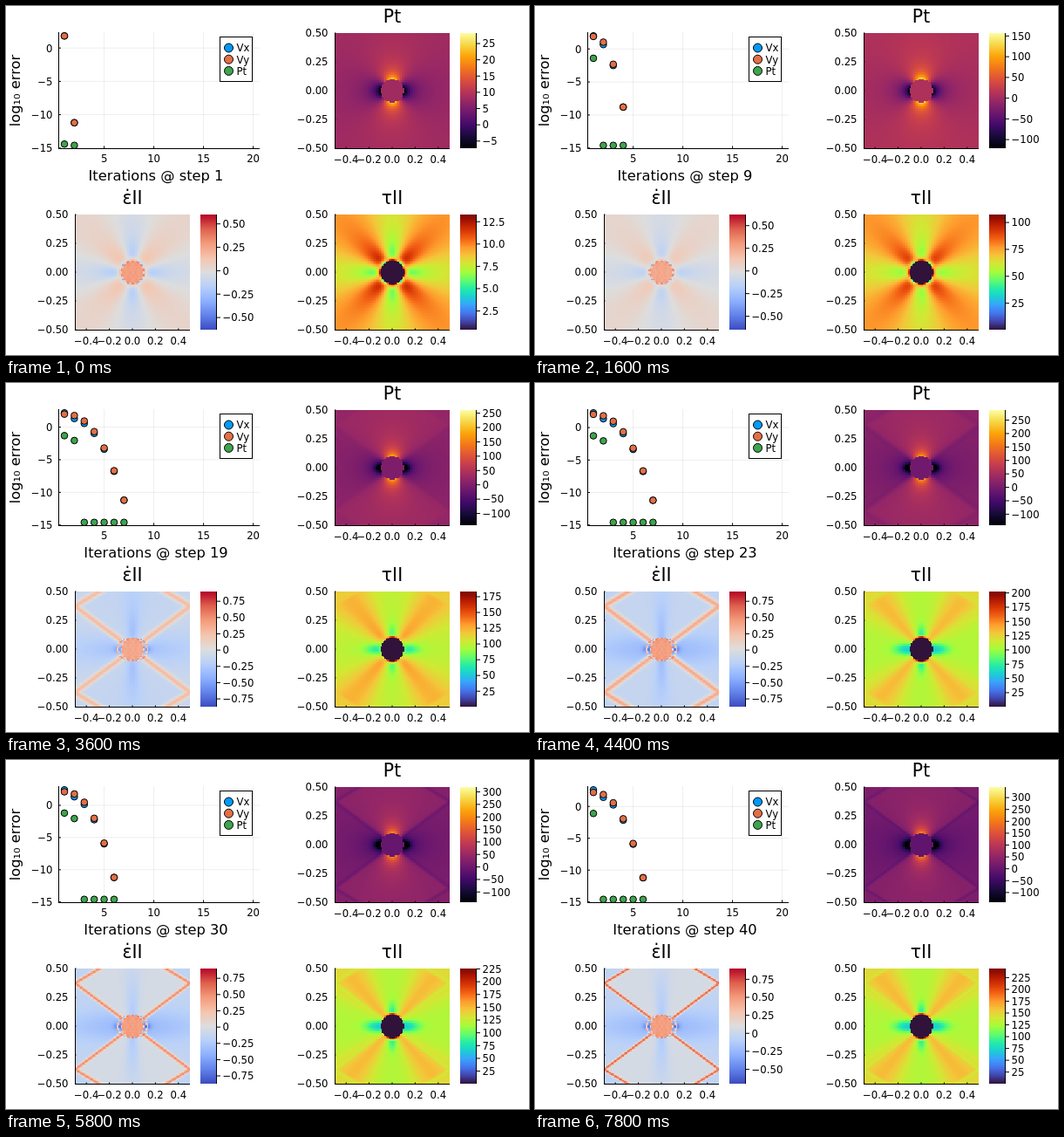
These frames come from a looping animation (600 px wide and 400 px high, 8 s). An HTML page with a canvas:

```html
<!DOCTYPE html>
<html lang="en">
<head>
<meta charset="utf-8">
<title>Shear band formation around a weak inclusion</title>
<style>
html, body { margin: 0; width: 100%; height: 100%; overflow: hidden; background: #fff; }
canvas { display: block; }
</style>
</head>
<body>
<canvas id="stage" width="600" height="400"></canvas>
<script>
const ctx = document.getElementById('stage').getContext('2d');
const FONT = '"DejaVu Sans", sans-serif';
const STEP_MS = 200, STEPS = 40, N = 88, SIZE = 132;
const SERIES = [['Vx', '#009afa'], ['Vy', '#e36f47'], ['Pt', '#3ea44e']];

const mix = (a, b, t) => a + (b - a) * t;
const clamp = v => Math.min(1, Math.max(0, v));
const bell = v => Math.exp(-v * v);
const smooth = (a, b, v) => { const t = clamp((v - a) / (b - a)); return t * t * (3 - 2 * t); };
const hash = (i, j) => { const v = Math.sin(i * 12.99 + j * 78.23) * 43758.5; return v - Math.floor(v); };

// Loading history: stress saturates while the bands localise
function paramsAt(s) {
  const tMax = 2 + 258 * (1 - Math.exp(-((s / 16) ** 1.12)));
  const pMax = 10 + 1.37 * tMax, pMin = Math.max(7 - 14.2 * s, -141);
  const yielding = smooth(8, 14, s);
  return {
    tMin: .4, tMax, pMin, pMax,
    eMin: -mix(.63, .87, yielding) + .17 * smooth(35, 40, s),
    eMax: mix(.6, .9, yielding),
    pBase: (8 - pMin) / (pMax - pMin),
    pert: .5 + .4 * Math.exp(-s / 12),
    core: .74 - .13 * bell((s - 14) / 4),
    plastic: smooth(11, 23, s),
    ear: yielding,
    sharp: smooth(17, 30, s),
    width: .012 + .014 * Math.exp(-Math.max(0, s - 23) / 5),
    peak: .7 + .16 * smooth(22, 38, s)
  };
}

// Newton residuals of one step: slow start, then fast convergence
function residualsAt(s) {
  const n = s < 7 ? 2 : s < 18 ? 4 : s < 27 ? 7 : 6;
  const top = 1.8 + .01 * s, end = -11.2 + 2.4 * bell((s - 9) / 2), floor = -14.6;
  const vx = [], vy = [], pt = [];
  for (let i = 0; i < n; i++) {
    const u = i / (n - 1);
    vy.push(mix(top, end, u ** 2.3));
    vx.push(vy[i] + (i ? -.55 * (1 - u) : .01 * s));
    pt.push(floor);
  }
  pt[0] = n > 2 ? -1.5 + .01 * s : -14.4;
  if (s > 17 && s < 38) pt[1] = -2.05;
  return [vx, vy, pt];
}

function gradient(hex) {
  const stops = hex.split(' ').map(h => [0, 2, 4].map(i => parseInt(h.substr(i, 2), 16)));
  return v => {
    const p = v * (stops.length - 1), i = Math.min(stops.length - 2, Math.floor(p));
    return stops[i].map((c, n) => Math.round(mix(c, stops[i + 1][n], p - i)));
  };
}
const inferno = gradient('000004 160b39 420a68 6a176e 932667 bc3754 dd513a f37819 fca50a f6d746 fcffa4');
const coolwarm = gradient('3b4cc0 6282ea 8db0fe b8d0f9 dddddd f5c4ad f49a7b de604d b40426');
const turbo = gradient('30123b 4145ab 4675ed 39a2fc 1bcfd4 24eca6 61fc6c a4fc3b d1e834 f3c63a fe9b2d f36315 d93806 b11901 7a0403');

// Pressure, strain rate and stress in one quadrant, each scaled to 0..1
function fieldsAt(i, j, p) {
  const x = (i + .5) / N, y = (j + .5) / N, r = Math.hypot(x, y), angle = Math.atan2(y, x);
  const zero = -p.eMin / (p.eMax - p.eMin), noise = hash(i, j);
  const rim = Math.abs(Math.hypot(x / (1 + .3 * p.ear), y) - .1) < .007;
  const speck = noise < .4 ? .85 : noise < .55 ? .2 : .55;

  if (r < .1) {
    const core = p.core + (noise - .5) * .04;
    return [p.pBase - .03 * p.plastic, r > .092 ? mix(core, speck, .5) : core, 0];
  }

  // Elastic solution around a weak disc
  const q = .01 / (r * r), c2 = Math.cos(2 * angle), s2 = Math.sin(2 * angle);
  const h = p.pert * (2 * q - 3 * q * q);
  const g = Math.hypot(c2 * (1 - h), s2 * (1 + h)) - .06 * Math.cos(4 * angle) * (1 - q);
  const pe = p.pBase - .5 * q * c2;
  const ee = zero + Math.log10(Math.max(.2, g)) / (p.eMax - p.eMin);
  const te = .66 * g;

  // Plastic state: shear band reflected at the side wall
  const above = y - .75 * x, beyond = y - .375 - .6 * (.5 - x);
  const band = Math.max(bell(above / 1.25 / p.width) * smooth(.1, .13, r), bell(beyond / 1.17 / p.width));
  const wedge = smooth(-.03, .03, above), corner = smooth(-.02, .02, beyond);
  const zone = (side, mid, end) => mix(mix(side, mid, wedge), end, corner);
  const axis = bell(x / (.03 + .12 * y)) * bell(y / .45);
  const ear = bell((x - .12) / .04) * bell(y / .03);
  const cap = bell((r - .1) / .015) * bell(x / .05) * (y > x ? 1 : 0);

  const pp = zone(p.pBase + .02, p.pBase + .06, p.pBase + .04) - .4 * q * c2
    - .2 * ear - .05 * band * p.sharp;
  const ep = zone(.41 - .12 * bell(y / .14) * bell(x / .6), .38 + .09 * p.sharp - .12 * axis, .4) - .2 * ear;
  const tp = mix(.52 + .14 * bell((angle - .87) / .33), .6, corner)
    - .24 * bell((x - .11) / .12) * bell(y / .05)
    - .16 * bell((y - .11) / .1) * bell(x / .04)
    - .04 * band * p.sharp + .7 * cap;

  const w = p.plastic, e = mix(ee, mix(ep, p.peak, band), w);
  return [mix(pe, pp, w), rim ? mix(e, speck, .7) : e, mix(te, tp, w)];
}

const MAPS = [
  { x: 377, y: 31, title: 'Pt', base: 18.5, color: inferno, key: 'p' },
  { x: 79, y: 239, title: 'ε\u0307II', base: 226.5, color: coolwarm, key: 'e' },
  { x: 377, y: 239, title: 'τII', base: 226.5, color: turbo, key: 't' }
];
for (const m of MAPS) {
  m.buf = document.createElement('canvas');
  m.buf.width = m.buf.height = N;
  m.ctx = m.buf.getContext('2d');
  m.img = m.ctx.createImageData(N, N);
}

function paintFields(p) {
  const half = N / 2;
  for (let j = 0; j < half; j++) for (let i = 0; i < half; i++) {
    fieldsAt(i, j, p).forEach((v, k) => {
      const m = MAPS[k], c = m.color(clamp(v));
      for (const col of [half + i, half - 1 - i]) for (const row of [half + j, half - 1 - j])
        m.img.data.set([...c, 255], (row * N + col) * 4);
    });
  }
  for (const m of MAPS) m.ctx.putImageData(m.img, 0, 0);
}

function text(s, x, y, size = 11.7, align = 'center') {
  ctx.font = size + 'px ' + FONT;
  ctx.textAlign = align;
  ctx.fillStyle = '#000';
  ctx.fillText(s, x, y);
}
function line(x1, y1, x2, y2, color = '#000') {
  ctx.strokeStyle = color;
  ctx.lineWidth = 1;
  ctx.beginPath();
  ctx.moveTo(x1, y1);
  ctx.lineTo(x2, y2);
  ctx.stroke();
}
function dot(x, y, r, color) {
  ctx.beginPath();
  ctx.arc(x, y, r, 0, 2 * Math.PI);
  ctx.fillStyle = color;
  ctx.fill();
  ctx.strokeStyle = '#000';
  ctx.lineWidth = 1;
  ctx.stroke();
}
const num = (v, digits) => v.toFixed(digits).replace('-', '\u2212');

function tickUnit(range) {
  const n = Math.floor(Math.log10(range)), f = range / 10 ** n;
  return (f > 5 ? 1 : f > 2.5 ? .5 : .25) * 10 ** n;
}

function drawMap(m, p) {
  const { x, y } = m, bottom = y + SIZE, mid = x + SIZE / 2;
  ctx.imageSmoothingEnabled = false;
  ctx.drawImage(m.buf, x, y, SIZE, SIZE);
  line(x + .5, y, x + .5, bottom + 1);
  line(x, bottom + .5, x + SIZE, bottom + .5);
  text(m.title, mid, m.base, 20.4);
  for (let k = -2; k <= 2; k++) {
    const tx = mid + k * .2 * SIZE, ty = y + SIZE / 2 - k * .25 * SIZE;
    line(tx, bottom, tx, bottom - 1.5);
    line(x, ty, x + 1.5, ty);
    text(num(k * .2, 1), tx, bottom + 16.5);
    text(num(k * .25, 2), x - 7.5, ty + 4.4, 11.7, 'right');
  }

  const bx = x + 144, lo = p[m.key + 'Min'], hi = p[m.key + 'Max'];
  for (let r = 0; r < SIZE; r++) {
    ctx.fillStyle = 'rgb(' + m.color(1 - (r + .5) / SIZE) + ')';
    ctx.fillRect(bx, y + r, 18, 1);
  }
  line(bx + 18.5, y, bx + 18.5, bottom);
  const unit = tickUnit(hi - lo);
  const digits = unit < 1 ? 2 : unit % 1 ? 1 : 0;
  for (let k = Math.ceil(lo / unit); k * unit <= hi; k++) {
    const ty = y + SIZE * (hi - k * unit) / (hi - lo);
    line(bx + 18, ty, bx + 23, ty);
    text(k ? num(k * unit, digits) : '0', bx + 25.5, ty + 4.3, 11.7, 'left');
  }
}

function drawErrors(step) {
  const runs = residualsAt(step), all = runs.flat();
  const min = Math.min(...all), max = Math.max(...all), pad = .03 * (max - min);
  const X = n => 55.6 + 11.4 * n;
  const Y = v => 30.5 + 133 * (max + pad - v) / (max - min + 2 * pad);
  const grid = 'rgba(0,0,0,.07)';

  for (let n = 5; n <= 20; n += 5) {
    line(X(n), 30, X(n), 163, grid);
    line(X(n), 163, X(n), 160.5);
    text(n, X(n), 179);
  }
  for (let v = 0; v >= -15; v -= 5) {
    line(60, Y(v), 291, Y(v), grid);
    line(60, Y(v), 63, Y(v));
    text(num(v, 0), 53.5, Y(v) + 4.4, 11.7, 'right');
  }
  line(60.5, 30, 60.5, 164);
  line(60, 163.5, 291, 163.5);

  SERIES.forEach(([, color], s) => runs[s].forEach((v, n) => dot(X(n + 1), Y(v), 3.8, color)));

  ctx.fillStyle = '#fff';
  ctx.fillRect(245.5, 35.5, 37, 51);
  ctx.strokeRect(245.5, 35.5, 37, 51);
  SERIES.forEach(([name, color], s) => {
    const y = 48 + 13.2 * s;
    dot(255.5, y, 5, color);
    text(name, 264.5, y + 4.4, 11.7, 'left');
  });

  text('Iterations @ step ' + step, 172, 200, 16.3);
  ctx.save();
  ctx.translate(15.5, 97);
  ctx.rotate(-Math.PI / 2);
  text('log₁₀ error', 0, 0, 16.3);
  ctx.restore();
}

function draw(step) {
  const p = paramsAt(step);
  ctx.fillStyle = '#fff';
  ctx.fillRect(0, 0, 600, 400);
  paintFields(p);
  drawErrors(step);
  for (const m of MAPS) drawMap(m, p);
}

const start = performance.now();
let shown = 0;
function frame() {
  const step = Math.floor((performance.now() - start) / STEP_MS) % STEPS + 1;
  if (step !== shown) draw(shown = step);
  requestAnimationFrame(frame);
}
frame();
</script>
</body>
</html>
```
